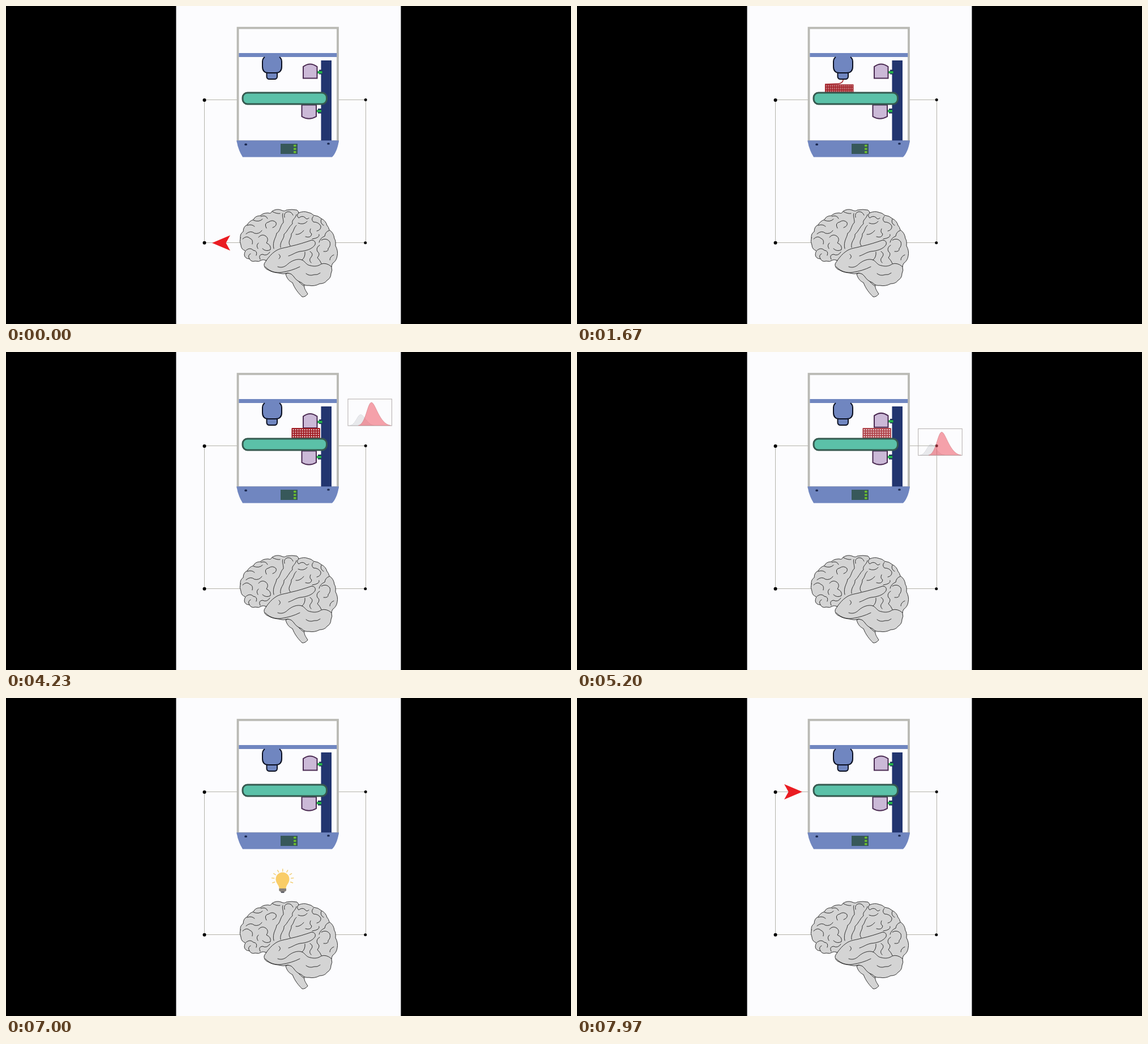
Write an HTML page that moves like this. It is 998 px wide and 561 px high and loops after 8 s.

```html
<!DOCTYPE html>
<html lang="en">
<head>
<meta charset="utf-8">
<title>Print, test, learn</title>
<style>
  html, body { margin: 0; width: 100%; height: 100%; overflow: hidden; background: #000; }
  svg { display: block; width: 100vw; height: 100vh; }
</style>
</head>
<body>
<svg viewBox="0 0 998 561" fill="none">
  <rect width="998" height="561" fill="#000"/>
  <rect x="300.5" width="397" height="561" fill="#fcfcfe"/>

  <!-- circuit -->
  <path d="M350.5 165.500H635.500V417.500H350.500Z" stroke="#b4b3aa"/>
  <g fill="#000">
    <circle cx="350.500" cy="166" r="3"/><circle cx="350.500" cy="417.800" r="3"/>
    <circle cx="635.200" cy="165.500" r="2.500"/><circle cx="634.800" cy="417.800" r="2.500"/>
  </g>

  <!-- printer -->
  <rect x="409.500" y="38.700" width="176.500" height="200" fill="#fcfcfe" stroke="#b9b9b4" stroke-width="3.800"/>
  <rect x="411.300" y="83" width="173" height="7" fill="#7086c0"/>
  <g fill="#7086c0" stroke="#0b1022" stroke-width="2">
    <rect x="460.500" y="114" width="18.500" height="15" rx="4.500"/>
    <path d="M457 90Q453 93 453 98V107Q453 118 464 118H476Q487 118 487 107V98Q487 93 483 90"/>
  </g>
  <rect x="556.500" y="96" width="18.500" height="142" fill="#22356f"/>
  <g id="clamp">
    <rect x="553" y="112.500" width="6" height="8" fill="#1d2c5c"/>
    <rect x="549" y="114.800" width="9.500" height="4.200" fill="#25b24b"/>
    <path d="M525 127.500V107Q537 98 549.500 107V127.500Z" fill="#cbb9d7" stroke="#4b2b52" stroke-width="2"/>
  </g>
  <rect x="551" y="181" width="6" height="8.500" fill="#1d2c5c"/>
  <rect x="547.500" y="183.200" width="9.500" height="4.200" fill="#25b24b"/>
  <path d="M522.500 174.500H548V195Q535 202.500 522.500 195Z" fill="#cbb9d7" stroke="#4b2b52" stroke-width="2"/>
  <g id="printing" stroke="#a11d24">
    <path id="mesh" stroke-width="1.700"/>
    <path d="M470 130C470 136 463 137.500 457 137.200L438 138" stroke-width="1.500"/>
  </g>
  <path id="gel" stroke="#a11d24" stroke-width="2.200"/>
  <rect x="418" y="153" width="148.500" height="20" rx="8.500" fill="#5bc1a8" stroke="#35594f" stroke-width="3"/>
  <path d="M407.300 237.200H588C586.500 249 582.500 260 576 266.500H418Q409.500 253 407.300 237.200Z" fill="#7086c0"/>
  <rect x="485" y="243" width="30" height="18" fill="#37585a"/>
  <g fill="#6dc22c">
    <rect x="508" y="244.700" width="4.500" height="3.400" rx="1"/>
    <rect x="508" y="250.400" width="4.500" height="3.400" rx="1"/>
    <rect x="508" y="256" width="4.500" height="3.400" rx="1"/>
  </g>
  <g fill="#1c2950">
    <rect x="421.300" y="242.500" width="4.600" height="3.400" rx="1.500"/>
    <rect x="567.200" y="241.200" width="4.600" height="3.400" rx="1.500"/>
  </g>

  <!-- brain -->
  <g stroke="#202020" stroke-width=".9" stroke-linecap="round" stroke-linejoin="round">
    <path fill="#d4d4d4" d="M494 473C496 481 501 486 506 488C510 499 517 507 523 513Q528 514 533 508C530 503 526 498 527 493L518 466Z"/>
    <path d="M510 473C512 482 518 488 526 494"/>
    <path fill="#d4d4d4" d="M414 409Q413 402 419 398Q419 389 426 386Q430 379 437 377Q440 370 449 370Q454 365 463 365Q468 367 470 362Q478 357 486 360Q492 363 495 360Q505 358 514 360Q517 363 517 365Q526 361 533 364Q540 365 543 369Q552 370 557 375Q565 379 567 387Q570 390 571 395Q579 400 580 410Q583 414 582 423Q587 432 585 441Q584 449 577 454Q575 457 575 461Q577 466 574 472Q574 480 567 484Q563 490 554 490Q545 495 535 493Q527 494 522 488Q513 485 508 477Q505 472 498 471Q490 474 481 471Q470 470 464 466Q455 463 456 455Q458 451 460 449Q455 447 452 448Q447 452 440 450Q433 452 430 446Q422 446 421 439Q421 435 423 432Q415 429 415 422Q412 416 414 409Z"/>
    <!-- temporal lobe -->
    <path d="M459 450C464 443 469 437 475 433C483 427 492 427 502 424C516 421 528 417 540 413Q548 414 546 421C541 429 530 432 519 433C510 435 506 439 499 441"/>
    <path d="M480 460C488 463 494 459 498 455C505 449 515 445 523 448C529 451 530 457 538 458C545 460 552 459 557 455"/>
    <path d="M458 460C466 469 477 471 486 470C499 468 509 465 519 460M482 438Q487 442 482 446"/>
    <!-- cerebellum -->
    <path d="M530 472Q536 477 544 474Q550 475 555 471M557 455Q566 452 575 460M523 448Q529 443 528 434"/>
    <!-- central folds -->
    <path d="M473 428C470 415 477 409 478 401C485 397 484 387 490 382C490 374 487 370 489 366"/>
    <path d="M485 426C483 415 492 411 491 403C497 398 500 389 506 384C504 377 511 376 513 368"/>
    <path d="M502 423C496 415 505 410 504 402C509 397 508 391 513 387"/>
    <path d="M512 403Q519 404 526 396M516 383Q526 387 532 380M529 407Q539 410 540 402Q535 399 538 393M541 411Q555 409 553 403"/>
    <path d="M517 365Q512 369 517 374Q523 369 528 373Q531 378 535 374"/>
    <!-- frontal lobe -->
    <path d="M426 387Q434 384 439 389M437 378Q447 382 453 376M424 402Q432 395 439 401Q447 403 452 396M460 392Q455 383 464 381Q471 376 477 382Q479 388 471 391"/>
    <path d="M450 371Q459 368 462 375M471 363Q479 367 484 366M492 373Q490 365 497 363Q504 362 507 369"/>
    <path d="M418 411Q425 404 431 410Q437 412 435 420M446 408Q452 401 459 406Q465 411 460 418Q469 422 467 430Q459 434 453 428"/>
    <path d="M424 431Q431 425 437 431Q445 432 442 440M430 446Q426 440 432 437M449 447Q445 439 453 438Q461 442 466 434M446 418Q441 422 445 428"/>
    <!-- parietal and occipital lobes -->
    <path d="M543 371Q538 376 543 381Q552 381 556 388Q557 395 549 397M557 376Q554 383 561 387"/>
    <path d="M571 396Q564 398 563 406Q555 409 553 417M557 413Q566 408 572 416Q574 423 569 428Q570 434 561 433"/>
    <path d="M554 422Q547 426 550 433Q556 437 550 444Q555 449 557 454M579 439Q572 442 572 448M537 433Q544 437 539 443Q534 448 539 453"/>
  </g>

  <g id="bulb">
    <path id="rays" stroke="#f2cf78" stroke-width="1.500"/>
    <path d="M482.500 336C482 329 476.500 327 476.500 319.500A12 12 0 0 1 500.500 319.500C500.500 327 495 329 494.500 336Z" fill="#f9cd68"/>
    <path d="M482.300 336H495V340L492.500 341.700H485L482.300 340Z" fill="#85807c"/>
    <rect x="485.500" y="341.500" width="6.200" height="2.300" rx="1" fill="#4d4f57"/>
  </g>

  <g id="graph">
    <rect x=".5" y=".5" width="77.500" height="47" stroke="#b3aeac"/>
    <path d="M4 47C14 46 17 28 23 28C29 28 35 46 47 47Z" fill="#8b929c" fill-opacity=".18" stroke="#a9adb3" stroke-width=".5" stroke-dasharray="1 1"/>
    <path id="peak" d="M19 47C32 45 35 6.500 42 6.500C49 6.500 56 45 76 47Z" fill="#f0505f" fill-opacity=".52" stroke="#cf7d83" stroke-width=".6"/>
  </g>
  <path id="arrow" d="M16 0L-16 -13.500L-8.500 0L-16 13.500Z" fill="#ea1c22"/>
  <path id="route" d="M380 418H364.500Q350.500 418 350.500 404V180Q350.500 165.500 364.500 165.500H382"/>
</svg>
<script>
const LOOP = 8000;
const $ = id => document.getElementById(id);
const part = {};
for (const id of ["clamp", "printing", "gel", "bulb", "graph", "peak", "arrow"]) part[id] = $(id);

const ramp = (t, start, span) => Math.min(1, Math.max(0, (t - start) / span));
const ease = p => (1 - Math.cos(Math.PI * p)) / 2;
const mix = (a, b, p) => a + (b - a) * p;
const show = (el, value) => el.setAttribute("opacity", value);
const place = (el, x, y, turn = 0) =>
  el.setAttribute("transform", `translate(${x} ${y}) rotate(${turn})`);
// Dissolve between scenes
const fade = (t, start) => ramp(t, start, 250);

function grid(x, y, w, h, cols, rows) {
  let d = "";
  for (let i = 0; i <= cols; i++) d += `M${x + w * i / cols} ${y}v${h}`;
  for (let i = 0; i <= rows; i++) d += `M${x - 0.8} ${y + h * i / rows}h${w + 1.6}`;
  return d;
}
$("mesh").setAttribute("d", grid(438.8, 139, 48.8, 13, 14, 5));
$("gel").setAttribute("d", grid(505.5, 135.2, 48.3, 16.3, 12, 4));

let rays = "";
for (let k = -4; k <= 4; k++) {
  const a = (-90 + k * 28) * Math.PI / 180;
  const at = r => `${488.7 + r * Math.cos(a)} ${319.5 + r * 0.92 * Math.sin(a)}`;
  rays += `M${at(14.5)}L${at(19.8)}`;
}
$("rays").setAttribute("d", rays);

const route = $("route");
const length = route.getTotalLength();

function moveArrow(p) {
  const s = length * p;
  const pos = route.getPointAtLength(s);
  const a = route.getPointAtLength(Math.max(0, s - 5));
  const b = route.getPointAtLength(Math.min(length, s + 5));
  place(part.arrow, pos.x, pos.y, Math.atan2(b.y - a.y, b.x - a.x) * 180 / Math.PI);
}

function draw(t) {
  const again = t >= 7020;
  moveArrow(ease(ramp(t, again ? 7030 : 0, 770)));
  show(part.arrow, again ? 1 : 1 - fade(t, 1000));

  show(part.printing, fade(t, 1000) * (1 - fade(t, 2000)));
  const travel = ease(ramp(t, 5000, 730));
  show(part.gel, fade(t, 2000) * (1 - travel));
  place(part.clamp, 0, 6.5 * (fade(t, 3000) - travel));

  place(part.graph, mix(603.5, 596.3, travel), mix(82.5, 380.3, travel));
  show(part.graph, fade(t, 3000) * (1 - fade(t, 6000)));
  show(part.peak, ramp(t, 4000, 230));

  show(part.bulb, again ? 0 : fade(t, 6000));
}

function tick() {
  draw(performance.now() % LOOP);
  requestAnimationFrame(tick);
}
draw(0);
requestAnimationFrame(tick);
</script>
</body>
</html>
```
